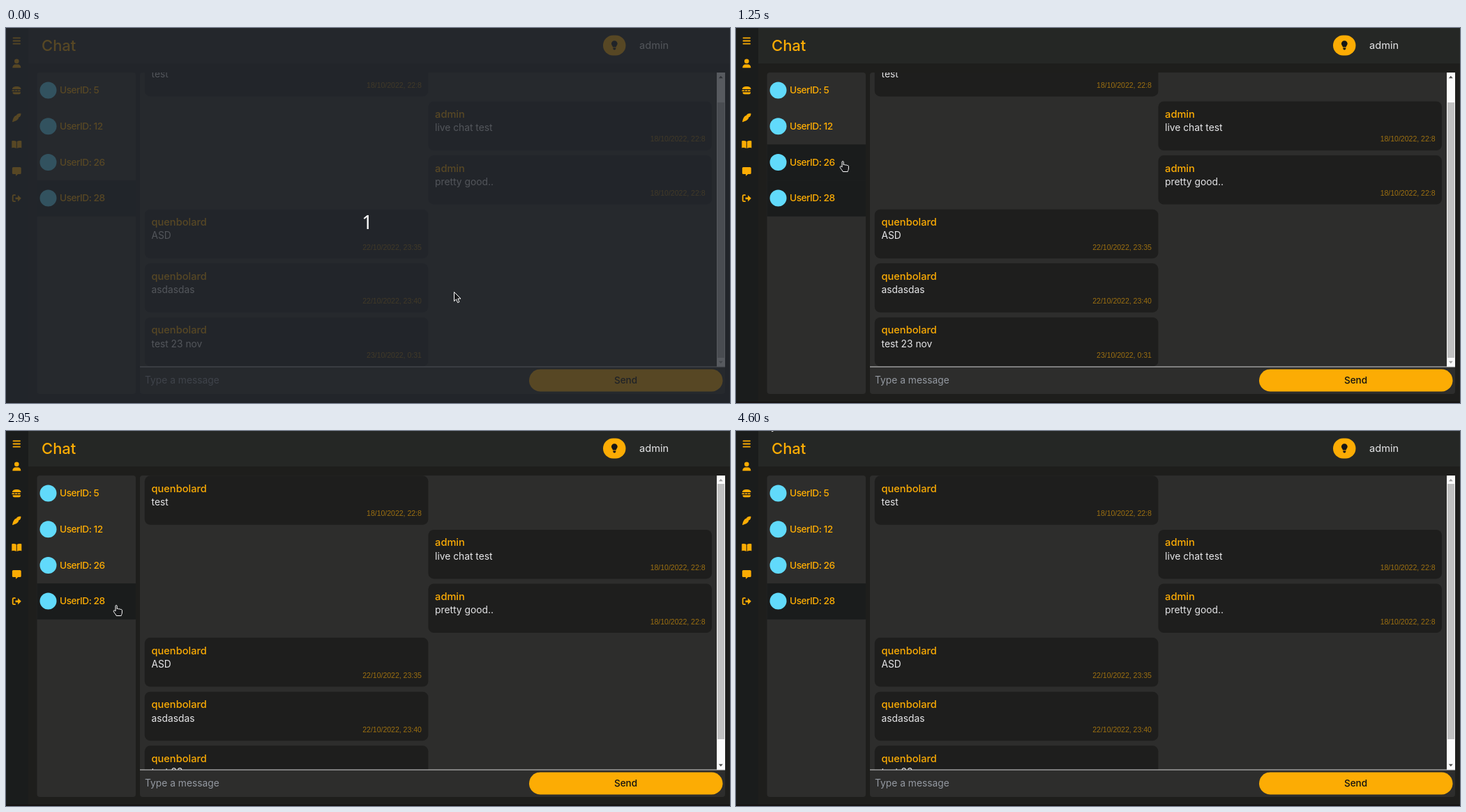
Recreate the animation shown at these times as an HTML page. Size 1038x539 px, loop 4.9 s.

```html
<!DOCTYPE html>
<html lang="en">
<head>
<meta charset="utf-8">
<title>Chat</title>
<style>
  html, body { margin: 0; width: 100%; height: 100%; overflow: hidden; background: #1e1e1c; }
  svg { display: block; width: 100vw; height: 100vh; }
  text { font: 400 13.8px Inter, "Open Sans", sans-serif; fill: #e6e6e8; }
  .amber { fill: #fcac04; }
  .name { font-size: 14.6px; font-weight: 500; fill: #fcac04; }
  .date { font: 400 10.5px "Liberation Sans", Arial, sans-serif; fill: #9d7011; text-anchor: end; }
  .user { font-size: 13.7px; font-weight: 500; fill: #fcac04; letter-spacing: -.5px; }
  .title { font-size: 22px; font-weight: 500; fill: #fcac04; }
  .hint { fill: #9499a1; }
  .send { font-size: 13.5px; font-weight: 500; fill: #111; text-anchor: middle; }
  .count { font: 400 27px "Noto Sans", "Open Sans", sans-serif; fill: #fff; text-anchor: middle; }
  .panel { fill: #2d2d2c; }
  .dark { fill: #1a1c1c; }
  .bubble { fill: #1e1e1d; }
  .line { fill: none; stroke: #fcac04; stroke-width: 1.8; stroke-linecap: round; stroke-linejoin: round; }
</style>
</head>
<body>
<svg viewBox="0 0 1038 539" preserveAspectRatio="none">
  <defs>
    <clipPath id="view"><rect x="192" y="64" width="839" height="423"/></clipPath>
    <clipPath id="side"><rect x="44.5" y="64" width="141.5" height="462" rx="4"/></clipPath>
  </defs>

  <rect width="1038" height="539" fill="#1e1e1c"/>
  <rect x="32" width="1006" height="51" fill="#252725"/>
  <rect class="dark" width="32" height="539"/>
  <rect y="537" width="1038" height="2" fill="#151211"/>

  <g id="nav" class="amber">
    <path class="line" d="M10.5 14.3h9.5M10.5 18.5h9.5M10.5 22.7h9.5" stroke-width="1.5"/>
    <circle cx="15.3" cy="47.7" r="3.3"/>
    <path d="M9.3 57.3c0-3.3 2-5 4.5-5h3c2.500 0 4.500 1.700 4.500 5z"/>
    <path d="M9 88c0-2.800 2.500-4 6.300-4s6.200 1.200 6.200 4zM9.500 92.300h11.600c0 2-1 3-2.700 3h-6.200c-1.700 0-2.700-1-2.700-3z"/>
    <path class="line" d="M9.300 90.200h12" stroke-width="1.300" stroke-dasharray="2 2.200"/>
    <path d="M9 135.200c1-4.600 2.300-9 6-9.700 1-2.600 3.400-3.200 6.400-2.700.3 3-1 5-3.300 5.700.2 3.300-4.600 5.500-9.100 6.700z"/>
    <path d="M8.300 162.500c2.500-.8 4.800-.4 6.500.6v10c-1.700-1-4-1.300-6.500-.7zM22.300 162.500c-2.500-.8-4.800-.4-6.500.6v10c1.700-1 4-1.300 6.500-.7z"/>
    <path d="M10.500 200h9.600a1.600 1.600 0 0 1 1.600 1.600v6.800a1.600 1.600 0 0 1-1.600 1.600h-2.800l-3.300 2.700v-2.700h-3.500a1.600 1.600 0 0 1-1.600-1.600v-6.800a1.600 1.600 0 0 1 1.600-1.600z"/>
    <path class="line" d="M13 240.200h-1.800q-1.500 0-1.500 1.500v6q0 1.500 1.500 1.500H13"/>
    <path d="M13.500 243.400h3.600v-3.200l4.700 4.600-4.700 4.600v-3.200h-3.600z"/>
  </g>

  <text class="title" x="51" y="33">Chat</text>
  <rect class="amber" x="856" y="10.500" width="32.500" height="29" rx="14.500"/>
  <path d="M872.300 18.300a4.300 4.300 0 0 1 4.400 4.300c0 2-1.700 3-2.200 5h-4.400c-.5-2-2.200-3-2.200-5a4.300 4.300 0 0 1 4.400-4.300zM870.200 28.500h4.200c0 2-.8 3-2.100 3s-2.100-1-2.100-3z" fill="#161616"/>
  <text x="908" y="29.500" style="font-size:14.600px">admin</text>

  <rect class="panel" x="44.500" y="64" width="141.500" height="462" rx="4"/>
  <g id="users" clip-path="url(#side)"></g>

  <rect class="panel" x="192" y="64" width="839" height="462" rx="4"/>
  <g clip-path="url(#view)">
    <g id="long"></g>
    <g id="short"></g>
    <g id="bar">
      <rect x="1019" y="64" width="12" height="423" fill="#fafafa"/>
      <rect id="thumb" x="1020" y="76" width="10" height="367" fill="#c1c1c1"/>
      <path id="up" d="M1021.800 72.300l3-3.600 3 3.600z"/>
      <path id="down" d="M1021.800 478.700l3 3.600 3-3.600z"/>
    </g>
  </g>
  <rect x="192" y="486.500" width="839" height="1" fill="#d4d4d4"/>
  <text class="hint" x="199" y="511">Type a message</text>
  <rect class="amber" x="750" y="490.500" width="277.500" height="32" rx="16"/>
  <text class="send" x="888.500" y="511">Send</text>

  <g id="veil">
    <rect width="1038" height="539" fill="#24282e" fill-opacity=".76"/>
    <text class="count" x="518" y="289">1</text>
  </g>

  <g id="pointer" stroke="#fff" stroke-width="1" stroke-linejoin="round" fill="#17181a">
    <path id="arrow" d="M.5 .5v13.200l3-2.800 2.100 4.800 2.300-1-2.100-4.700h4.200z"/>
    <path id="hand" d="M-1 9V1.500C-1 .1 1.200.1 1.200 1.500V6c.4-1 2.300-.9 2.500.2 .5-.8 2.200-.6 2.400.5 .6-.7 2.300-.3 2.300 1V11c0 2-1 2.800-1.200 4.500H.2C-.2 13.700-3.300 11-3.800 9.200c-.3-1.400 1.200-1.900 2-.9z"/>
  </g>
</svg>
<script>
const LOOP = 4900, STEP = 50, ROW = 51.7, TOP = 64;
const $ = id => document.getElementById(id);

function add(parent, tag, attrs, text) {
  const el = document.createElementNS("http://www.w3.org/2000/svg", tag);
  for (const key in attrs) el.setAttribute(key, attrs[key]);
  if (text) el.textContent = text;
  parent.append(el);
  return el;
}

// Contact list
const rows = [5, 12, 26, 28].map((id, i) => {
  const y = TOP + i * ROW, mid = y + 25.5;
  const back = add($("users"), "rect", { class: "dark", x: 44, y, width: 143, height: ROW });
  add($("users"), "circle", { cx: 60.5, cy: mid, r: 12, fill: "#61dafb" });
  add($("users"), "text", { class: "user", x: 77, y: mid + 4.8 }, "UserID: " + id);
  return back;
});

// Conversations: messages by "admin" stand on the right
function fill(group, width, list) {
  list.forEach(([name, text, date], i) => {
    const x = 198.8 + (name === "admin" ? width : 0), y = 64.3 + i * 77.6;
    add(group, "rect", { class: "bubble", x, y, width, height: 70.5, rx: 8 });
    add(group, "text", { class: "name", x: x + 9.7, y: y + 23.5 }, name);
    add(group, "text", { x: x + 9.7, y: y + 42.8 }, text);
    add(group, "text", { class: "date", x: x + width - 9.5, y: y + 58 }, date);
  });
}
const guest = "quenbolard";
fill($("long"), 406.6, [
  [guest, "test", "18/10/2022, 22:8"],
  ["admin", "live chat test", "18/10/2022, 22:8"],
  ["admin", "pretty good..", "18/10/2022, 22:8"],
  [guest, "ASD", "22/10/2022, 23:35"],
  [guest, "asdasdas", "22/10/2022, 23:40"],
  [guest, "test 23 nov", "23/10/2022, 0:31"]
]);
fill($("short"), 412.7, [
  ["sampleguest", "test", "17/10/2022, 14:43"],
  ["admin", "test", "17/10/2022, 14:43"]
]);

// Pointer path: time, x, y, eased
const path = [
  [0, 642, 379], [50, 654, 373], [300, 679, 347], [850, 679, 347],
  [1250, 153, 191, 1], [1950, 153, 191], [2000, 152, 195],
  [2350, 158, 250, 1], [3750, 158, 250], [4050, 109, 132],
  [4300, 52, 9], [4600, 46, -15], [LOOP, 46, -15]
];
function pointerAt(t) {
  const i = path.findIndex(p => p[0] > t);
  const a = path[i - 1], b = path[i];
  let k = (t - a[0]) / (b[0] - a[0]);
  if (b[3]) k = k * k * (3 - 2 * k);
  return [a[1] + (b[1] - a[1]) * k, a[2] + (b[2] - a[2]) * k];
}

const show = (el, on) => el.setAttribute("visibility", on ? "visible" : "hidden");

function draw(time) {
  const t = Math.floor(time / STEP) * STEP;
  const [x, y] = pointerAt(t);
  const row = Math.floor((y - TOP) / ROW);
  const hover = x > 44 && x < 186 && row >= 0 && row < 4 ? row : -1;
  const active = t >= 1750 && t < 2950 ? 2 : 3;
  const brief = t >= 2000 && t < 2950;
  const scroll = t < 2000 ? 36.4 : 0;

  rows.forEach((el, i) => show(el, i === hover || i === active));
  show($("long"), !brief);
  show($("bar"), !brief);
  show($("short"), brief);
  $("long").setAttribute("transform", `translate(0 ${-scroll})`);
  $("thumb").setAttribute("y", scroll ? 107 : 76);
  $("up").setAttribute("fill", scroll ? "#505050" : "#a3a3a3");
  $("down").setAttribute("fill", scroll ? "#a3a3a3" : "#505050");
  show($("veil"), t < 50);
  show($("arrow"), hover < 0);
  show($("hand"), hover >= 0);
  $("pointer").setAttribute("transform", `translate(${Math.round(x)} ${Math.round(y)})`);
}

const start = performance.now();
function tick() {
  draw((performance.now() - start) % LOOP);
  requestAnimationFrame(tick);
}
tick();
</script>
</body>
</html>
```
